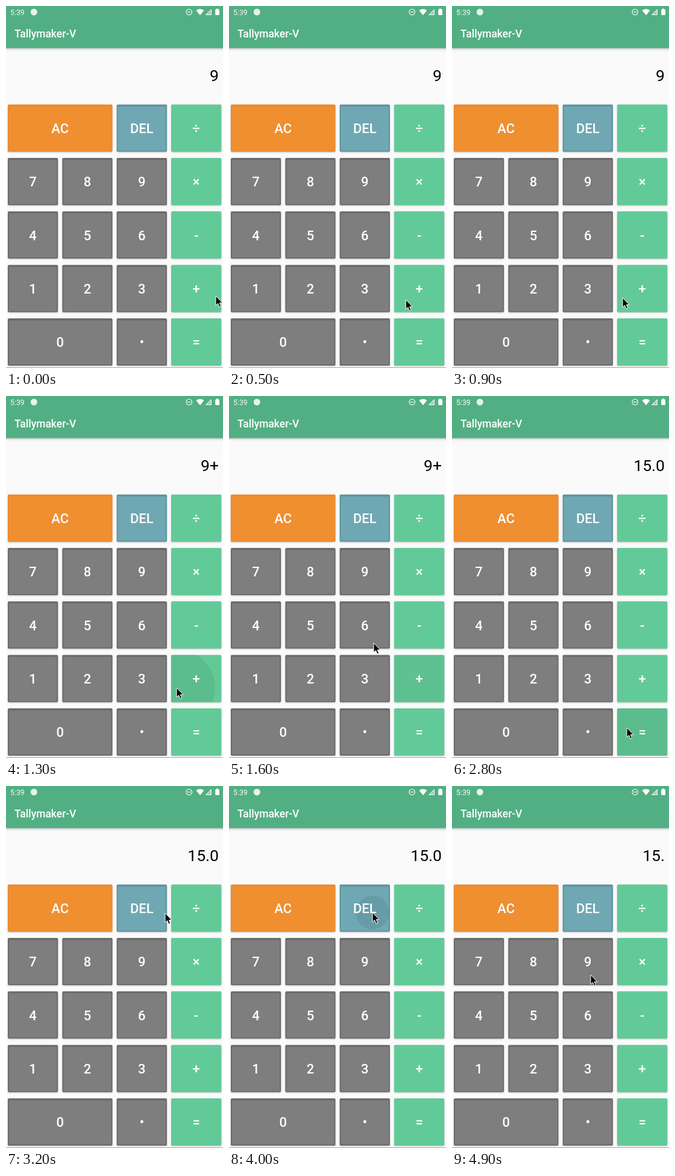
Recreate the animation shown at these times as an HTML page. Size 360 by 598 pixels, loop 5 s.

```html
<!DOCTYPE html>
<html lang="en">
<head>
<meta charset="utf-8">
<title>Calculator</title>
<style>
  html, body { margin: 0; width: 100%; height: 100%; overflow: hidden; background: #fafafa; }
  svg { position: absolute; left: 0; top: 0; display: block; }
  text { font-family: Roboto, sans-serif; }
  .label { font-size: 22px; font-weight: 500; fill: #fff; text-anchor: middle; }
  .key { filter: drop-shadow(0 1px 1px rgba(0, 0, 0, .24)); }
  .bar { filter: drop-shadow(0 1px 2px rgba(0, 0, 0, .32)); }
</style>
</head>
<body>
<svg id="stage" width="360" height="598" viewBox="0 0 360 598">
  <rect width="360" height="598" fill="#fafafa"/>
  <rect class="bar" x="-6" y="-6" width="372" height="75.5" fill="#52af83"/>
  <g fill="#fff">
    <text x="7" y="15" font-size="12.3" fill-opacity=".93">5:39</text>
    <circle cx="46.3" cy="10" r="5.5" fill-opacity=".85"/>
    <circle cx="303.7" cy="10" r="4.8" fill="none" stroke="#fff" stroke-width="1.1"/>
    <path d="M301 9.4h5.4v1.2h-5.4z"/>
    <path d="M315.4 7.2Q322 2.6 328.4 7.2L322 15.2z"/>
    <path d="M340.8 4.8V15H330.6z" fill-opacity=".4"/>
    <path d="M340.3 6V14.5H331.8z" fill="none" stroke="#fff"/>
    <path d="M349 4.3h2.6v1.2h1.6q.8 0 .8.8v8q0 .8-.8.8h-5.2q-.8 0-.8-.8v-8q0-.8.8-.8h1z"/>
    <text x="14" y="52" font-size="17.5" font-weight="500">Tallymaker-V</text>
  </g>
  <text id="display" x="353" y="123.7" font-size="26.5" text-anchor="end"></text>
  <g id="keys"></g>
  <rect y="597" width="360" height="1" fill="#a4a4a4"/>
  <path id="cursor" d="M0 0V15.6L3.6 12.3L6 18.2L8.6 17.1L6.2 11.4H11z"
    fill="#000" stroke="#fff" stroke-width="1" stroke-linejoin="round"/>
</svg>
<script>
const LOOP = 5000, STEP = 100;
const COLS = [3, 93.4, 183.7, 274], ROWS = [162.8, 251, 339.2, 427.7, 516];
const KEY_W = 83.2, KEY_H = 78;
const SKINS = {
  grey: ['#7e7e7e', '#6b6b6b'],
  blue: ['#6fa8b3', '#5c95a0'],
  orange: ['#ef8f30', '#ea8a2c'],
  green: ['#62ca98', '#62ca98']
};
// label, column, row, skin, columns spanned
const KEYS = [
  ['AC', 0, 0, 'orange', 2], ['DEL', 2, 0, 'blue'], ['÷', 3, 0, 'green'],
  ['7', 0, 1, 'grey'], ['8', 1, 1, 'grey'], ['9', 2, 1, 'grey'], ['×', 3, 1, 'green'],
  ['4', 0, 2, 'grey'], ['5', 1, 2, 'grey'], ['6', 2, 2, 'grey'], ['-', 3, 2, 'green'],
  ['1', 0, 3, 'grey'], ['2', 1, 3, 'grey'], ['3', 2, 3, 'grey'], ['+', 3, 3, 'green'],
  ['0', 0, 4, 'grey', 2], ['•', 2, 4, 'grey'], ['=', 3, 4, 'green']
];
// time, key, display after the tap
const TAPS = [
  [1200, '+', '9+'], [1800, '6', '9+6'], [2500, '=', '15.0'], [4000, 'DEL', '15.']
];
// time, x, y of the pointer tip
const PATH = [
  [0, 348, 479], [300, 312, 488], [600, 284, 484], [900, 283, 482], [1300, 283, 482],
  [1600, 240, 408], [1800, 236, 394], [2000, 237, 396], [2300, 268, 501],
  [2500, 290, 550], [2800, 290, 548], [3000, 284, 390], [3200, 264, 210],
  [3700, 238, 208], [4000, 238, 209], [4200, 238, 209], [4700, 230, 312]
];

const $ = id => document.getElementById(id);
const clamp = v => Math.max(0, Math.min(1, v));

function add(parent, tag, attrs) {
  const node = document.createElementNS('http://www.w3.org/2000/svg', tag);
  for (const name in attrs) node.setAttribute(name, attrs[name]);
  return parent.appendChild(node);
}

const ripples = {};
KEYS.forEach(([label, col, row, skin, span = 1], i) => {
  const x = COLS[col], y = ROWS[row];
  const w = KEY_W + (span - 1) * 90.3;
  const [face, edge] = SKINS[skin];
  const group = add($('keys'), 'g', {});
  const box = { x, y, width: w, height: KEY_H, rx: 1.8 };
  add(group, 'rect', { ...box, fill: edge, class: 'key' });
  add(group, 'rect', { x: x + 2, y: y + 3.4, width: w - 4, height: KEY_H - 5.2, rx: 1, fill: face });
  if (TAPS.some(tap => tap[1] === label)) {
    add(add(group, 'clipPath', { id: 'clip' + i }), 'rect', box);
    const layer = add(group, 'g', { 'clip-path': `url(#clip${i})` });
    ripples[label] = add(layer, 'circle', { r: 0, fill: '#000' });
  }
  add(group, 'text', { x: x + w / 2, y: y + 47.3, class: 'label' }).textContent = label;
});

function pointer(t) {
  const i = PATH.findIndex(p => p[0] > t);
  if (i < 0) return PATH[PATH.length - 1].slice(1);
  const a = PATH[i - 1], b = PATH[i];
  const k = (t - a[0]) / (b[0] - a[0]);
  return [a[1] + (b[1] - a[1]) * k, a[2] + (b[2] - a[2]) * k];
}

function draw(t) {
  const [x, y] = pointer(t);
  $('cursor').setAttribute('transform', `translate(${x} ${y})`);
  let shown = '9';
  for (const [start, key, result] of TAPS) {
    const age = t - start;
    if (age >= 100) shown = result;
    const ripple = ripples[key];
    const [cx, cy] = pointer(start);
    ripple.setAttribute('cx', cx);
    ripple.setAttribute('cy', cy);
    ripple.setAttribute('r', age < 0 ? 0 : 28 + 90 * clamp(age / 250));
    ripple.setAttribute('opacity', 0.07 * clamp((600 - age) / 300));
  }
  $('display').textContent = shown;
}

const begin = performance.now();
function tick() {
  const t = (performance.now() - begin) % LOOP;
  draw(Math.floor(t / STEP) * STEP);
  requestAnimationFrame(tick);
}
tick();
</script>
</body>
</html>
```
